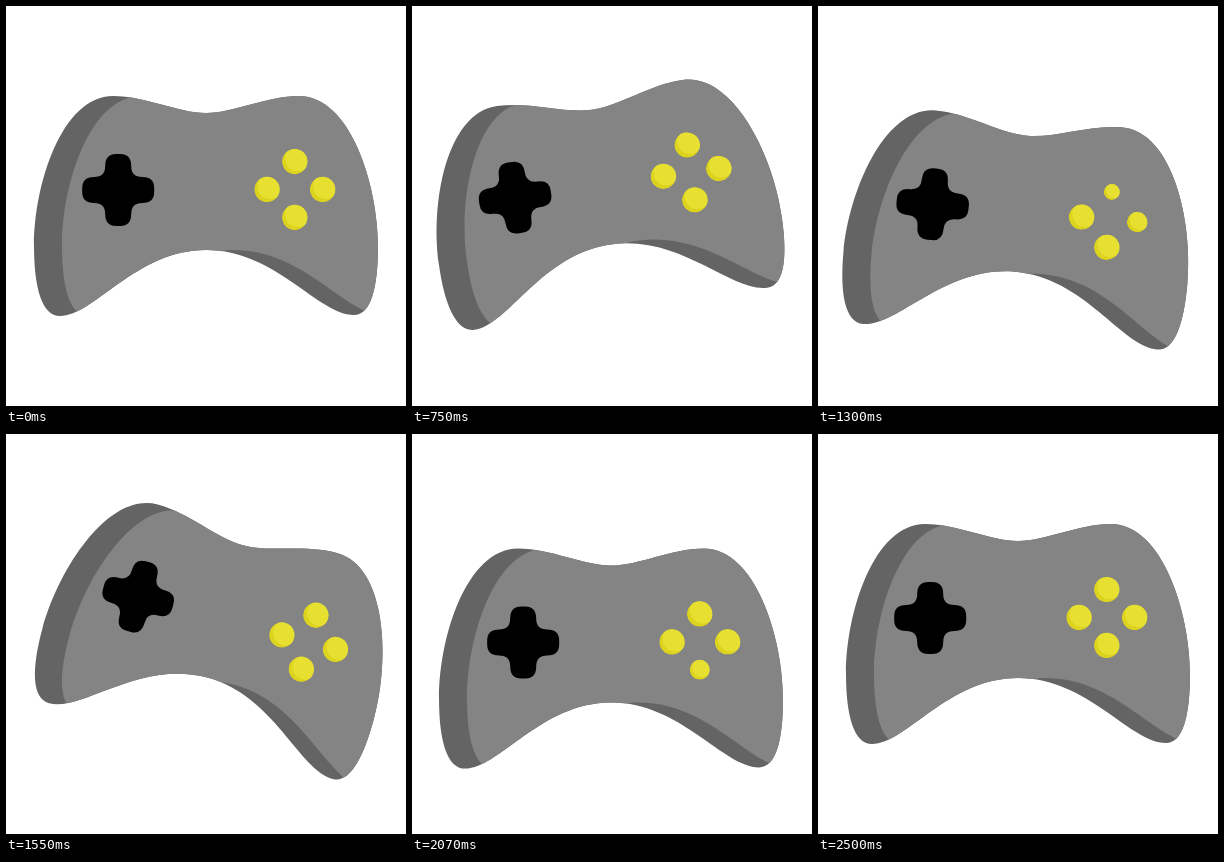
These frames come from a looping animation (400x400 px, 2520 ms). An HTML page:

```html
<!DOCTYPE html>
<html lang="en">
<head>
<meta charset="utf-8">
<title>Gamepad</title>
<style>
html, body { margin: 0; width: 100%; height: 100%; overflow: hidden; background: #fff; }
svg { display: block; width: 100%; height: 100%; }
</style>
</head>
<body>
<svg viewBox="0 0 400 400">
  <defs>
    <path id="shell" d="M107 90C140 90 172 107 200 107C228 107 260 90 293 90C344 90 372 178 372 240C372 282 365 309 348 309C312 309 270 244 200 244C130 244 88 310 54 310C36 310 28 282 28 240C28 178 56 90 107 90Z"/>
    <clipPath id="shellClip"><use href="#shell"/></clipPath>
    <clipPath id="buttonClip"><circle r="12.7"/></clipPath>
    <g id="button" clip-path="url(#buttonClip)">
      <circle r="12.7" fill="#dcd31f"/>
      <circle cx="3.2" cy="-3.2" r="12.7" fill="#e8e030"/>
    </g>
  </defs>
  <g id="pad">
    <use href="#shell" fill="#646464"/>
    <path clip-path="url(#shellClip)" fill="#848484" d="M135 90C84 90 56 178 56 240C56 282 64 310 82 310C116 310 158 244 228 244C298 244 340 309 376 309V80H135Z"/>
    <path id="cross" d="M-13-24Q-13-36-2-36H2Q13-36 13-24Q13-13 24-13Q36-13 36-2V2Q36 13 24 13Q13 13 13 24Q13 36 2 36H-2Q-13 36-13 24Q-13 13-24 13Q-36 13-36 2V-2Q-36-13-24-13Q-13-13-13-24Z"/>
    <use id="top" href="#button"/>
    <use id="right" href="#button"/>
    <use id="bottom" href="#button"/>
    <use id="left" href="#button"/>
  </g>
</svg>
<script>
const LOOP = 2520, HOLD = 520, LEAD = 500;
const $ = id => document.getElementById(id);

// time, x, y, rotation, horizontal stretch
const poses = [
  [0, 0, 0, 0, 1],
  [150, -2, 2, -2, 1.025],
  [450, -18, -24, -21, .955],
  [800, 1, 22, 5.1, 1.004],
  [870, 4, 23.5, 8.5, 1.045],
  [1240, 18, -23, 18.8, .95],
  [1300, 17, -20, 18, .957],
  [1470, 8, 24, 9.5, 1.045],
  [1570, -1, 24.5, 0, 1],
  [1780, -2, 4, -6.5, 1],
  [2000, 0, 0, 0, 1]
];

// centre and press start times
const buttons = {
  top: { x: 288.7, y: 155.6, presses: [718] },
  right: { x: 316.6, y: 183.5, presses: [0, 375, 752] },
  bottom: { x: 288.7, y: 211.4, presses: [1519] },
  left: { x: 261, y: 183.5, presses: [372] }
};

const slope = (i, k) =>
  (poses[i + 1][k] - poses[i][k]) / (poses[i + 1][0] - poses[i][0]);

function tangent(i, k) {
  if (i === 0 || i === poses.length - 1) return 0;
  const a = slope(i - 1, k), b = slope(i, k);
  return a * b > 0 ? 2 * a * b / (a + b) : 0;
}

// Smooth curve through the poses without overshoot
function sample(k, t) {
  let i = 0;
  while (i < poses.length - 2 && t >= poses[i + 1][0]) i++;
  const [a, b] = [poses[i], poses[i + 1]];
  const d = b[0] - a[0];
  const u = Math.min(1, (t - a[0]) / d), v = 1 - u;
  return v * v * ((1 + 2 * u) * a[k] + u * d * tangent(i, k))
    + u * u * ((1 + 2 * v) * b[k] - v * d * tangent(i + 1, k));
}

function pulse(t, start, length) {
  const u = (t - start) / length;
  return u > 0 && u < 1 ? Math.sin(Math.PI * u) ** 2 : 0;
}

function draw() {
  const clock = performance.now() % LOOP;
  const t = clock < HOLD ? 0 : clock - LEAD;
  const [x, y, turn, stretch] = [1, 2, 3, 4].map(k => sample(k, t));
  $("pad").setAttribute("transform",
    `translate(${200 + x} ${200 + y}) rotate(${turn}) scale(${stretch} ${2 - stretch}) translate(-200 -200)`);

  const crossX = 1 - .13 * pulse(t, 1100, 400);
  const crossY = 1 - .11 * pulse(t, 250, 400);
  $("cross").setAttribute("transform", `translate(112.2 184) scale(${crossX} ${crossY})`);

  for (const [id, b] of Object.entries(buttons)) {
    const depth = b.presses.reduce((sum, start) => sum + pulse(t, start, 200), 0);
    $(id).setAttribute("transform", `translate(${b.x} ${b.y}) scale(${1 - .4 * depth})`);
  }
  requestAnimationFrame(draw);
}
draw();
</script>
</body>
</html>
```
